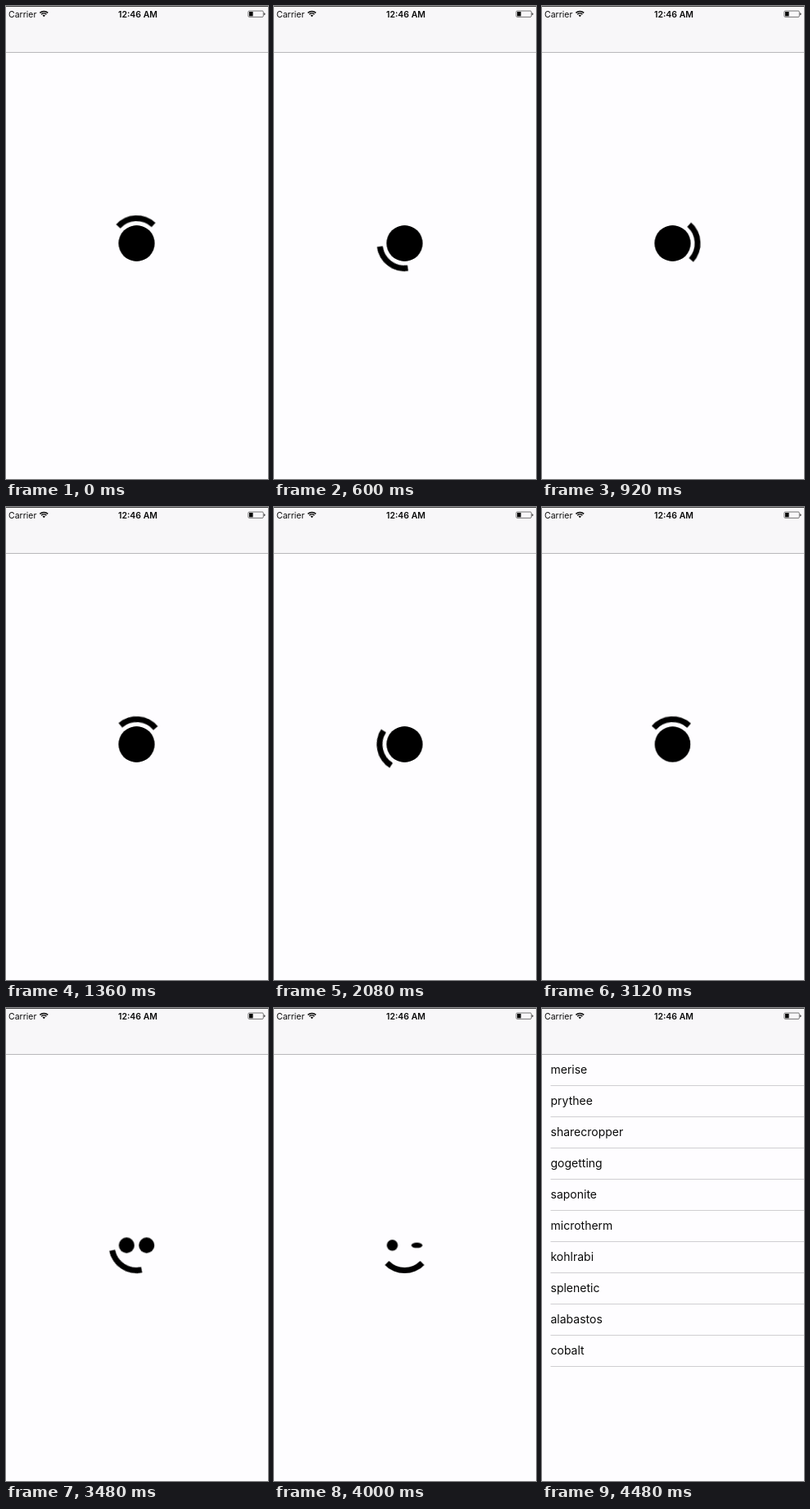
Recreate the animation shown at these times as an HTML page. Size 320 by 576 pixels, loop 5.04 s.

```html
<!DOCTYPE html>
<html lang="en">
<head>
<meta charset="utf-8">
<title>Winking loader</title>
<style>
  html, body { margin: 0; width: 100%; height: 100%; overflow: hidden; background: #fefdff; }
  svg { display: block; width: 100vw; height: 100vh; }
  text { font-family: Inter, "Liberation Sans", sans-serif; fill: #0a0a0a; }
  .status { font-size: 10.5px; }
  .clock { font-weight: 600; text-anchor: middle; }
  .rows text { font-size: 14px; }
  .rows path { stroke: #d0cfd2; }

  .arc, .eye, .loader, .rows { animation: 5.04s linear infinite; }
  .arc { animation-name: spin; fill: none; stroke: #000; stroke-width: 7; }
  .eye { animation-name: split; }
  .left { --dx: -15px; }
  .right { --dx: 15px; animation-name: split, wink; }
  .loader { animation-name: leave; animation-timing-function: step-end; }
  .rows { animation-name: enter; animation-timing-function: step-end; }

  /* two slow-fast-slow turns, then a half turn into the smile */
  @keyframes spin {
    0% { transform: rotate(-2.3deg); animation-timing-function: cubic-bezier(.333, .043, .667, .413); }
    11.905% { transform: rotate(-142deg); animation-timing-function: cubic-bezier(.333, .376, .667, .816); }
    22.222% { transform: rotate(-331deg); animation-timing-function: cubic-bezier(.333, .66, .667, .77); }
    26.984% { transform: rotate(-355.3deg); animation-timing-function: cubic-bezier(.333, .6, .667, 1); }
    29.365% { transform: rotate(-360deg); animation-timing-function: cubic-bezier(.333, 0, .667, .28); }
    33.333% { transform: rotate(-372deg); animation-timing-function: cubic-bezier(.333, .193, .667, .393); }
    41.27% { transform: rotate(-462deg); animation-timing-function: cubic-bezier(.333, .333, .667, .731); }
    51.587% { transform: rotate(-675deg); animation-timing-function: cubic-bezier(.333, .71, .667, .806); }
    55.556% { transform: rotate(-706deg); animation-timing-function: cubic-bezier(.333, .556, .667, 1); }
    60.714% { transform: rotate(-720deg); animation-timing-function: ease-in-out; }
    72.619%, 100% { transform: rotate(-900deg); }
  }
  @keyframes split {
    0%, 60.714% { transform: translateX(0px) scale(1); animation-timing-function: ease-in-out; }
    72.619%, 100% { transform: translateX(var(--dx)) scale(.31); }
  }
  @keyframes wink {
    0%, 77.778% { scale: 1 1; animation-timing-function: ease-in-out; }
    80.754% { scale: 1 .1; animation-timing-function: ease-in-out; }
    83.73%, 100% { scale: 1 1; }
  }
  @keyframes leave { 0% { opacity: 1; } 88.888%, 100% { opacity: 0; } }
  @keyframes enter { 0% { opacity: 0; } 88.888%, 100% { opacity: 1; } }
</style>
</head>
<body>
<svg viewBox="0 0 320 576">
  <rect width="320" height="576" fill="#fefdff"/>
  <rect width="320" height="56" fill="#f8f7f9"/>
  <rect y="56" width="320" height="1" fill="#b9b8bb"/>
  <rect width="320" height="1" fill="#444"/>

  <text class="status" x="3" y="13.5">Carrier</text>
  <g fill="none" stroke="#0a0a0a" stroke-width="1.5">
    <path d="M41.4 8.4a7 7 0 0 1 9.8 0M43.2 10.3a4.4 4.4 0 0 1 6.2 0"/>
    <path d="M46.3 13.3l-1.7-1.8a2.5 2.5 0 0 1 3.4 0z" fill="#0a0a0a" stroke="none"/>
  </g>
  <text class="status clock" x="161" y="13.5">12:46 AM</text>
  <rect x="295.9" y="6" width="18.4" height="7.4" rx="1.2" fill="none" stroke="#555" stroke-width=".8"/>
  <rect x="297" y="7" width="4.6" height="5.4" fill="#0a0a0a"/>
  <path d="M315.2 8.2q1.4 .4 1.4 1.5t-1.4 1.5z" fill="#333"/>

  <g class="loader">
    <g transform="translate(159.5 289)">
      <path class="arc" d="M-21.57-21.57A30.5 30.5 0 0 1 21.57-21.57"/>
      <circle class="eye left" r="21.75"/>
      <circle class="eye right" r="21.75"/>
    </g>
  </g>
  <g class="rows"></g>
</svg>
<script>
  const words = ["merise", "prythee", "sharecropper", "gogetting", "saponite",
    "microtherm", "kohlrabi", "splenetic", "alabastos", "cobalt"];
  const rowHeight = 38;
  document.querySelector(".rows").innerHTML = words.map((word, i) => {
    const y = 56 + i * rowHeight;
    return `<text x="10.5" y="${y + 24}">${word}</text><path d="M10.5 ${y + rowHeight + .5}H320"/>`;
  }).join("");
</script>
</body>
</html>
```
